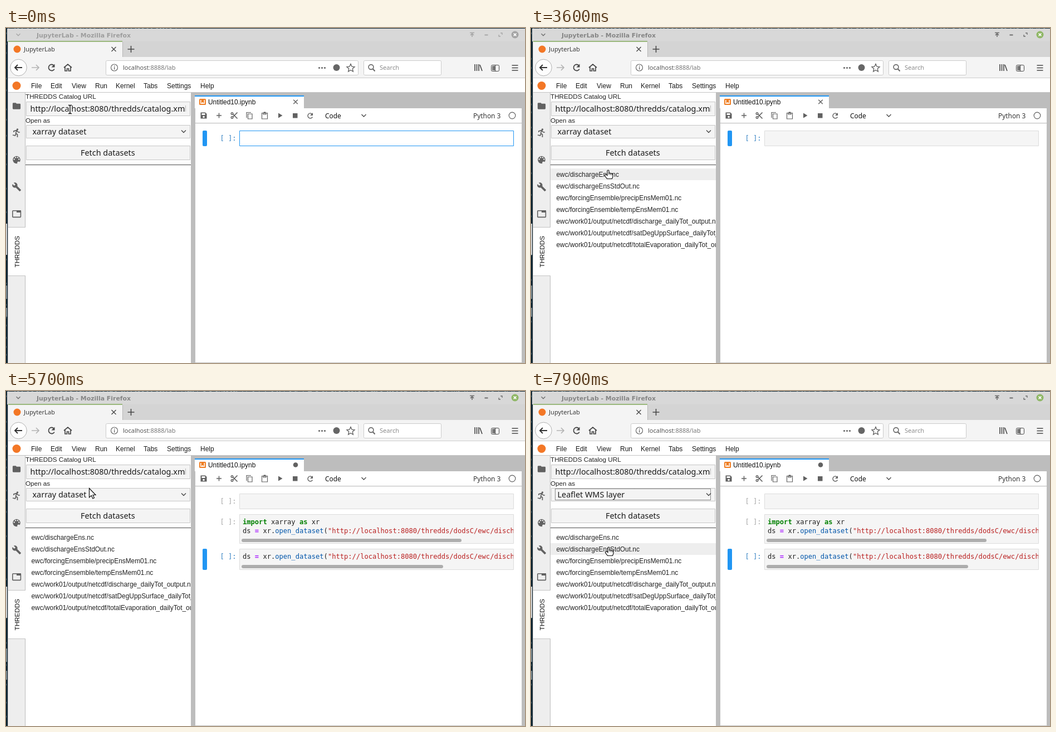
An HTML page with a canvas that plays this animation: 932 by 601 pixels, repeating every 8000 ms.

```html
<!DOCTYPE html>
<html lang="en">
<head>
<meta charset="utf-8">
<title>Dataset browser</title>
<style>
html, body { margin: 0; width: 100%; height: 100%; overflow: hidden; background: #bdbdbd; }
canvas { display: block; width: 932px; height: 601px; }
</style>
</head>
<body>
<canvas id="stage" width="932" height="601"></canvas>
<script>
const g = document.getElementById('stage').getContext('2d');
const LOOP = 8000;
const ARIAL = '"Liberation Sans", Arial, sans-serif';
const NOTO = '"Noto Sans", "Open Sans", sans-serif';
const MONO = '"DejaVu Sans Mono", monospace';
const ICON = '#616161', CHROME = '#474747', BLUE = '#2196f3', GREEN = '#9ab87c', ORANGE = '#f37726';

function rect(x, y, w, h, fill) {
  g.fillStyle = fill;
  g.fillRect(x, y, w, h);
}
function box(x, y, w, h, fill, border, r = 0) {
  g.beginPath();
  g.roundRect(x + .5, y + .5, w - 1, h - 1, r);
  g.fillStyle = fill;
  g.fill();
  g.strokeStyle = border;
  g.lineWidth = 1;
  g.stroke();
}
function pill(x, y, w, h, r, fill) {
  g.beginPath();
  g.roundRect(x, y, w, h, r);
  g.fillStyle = fill;
  g.fill();
}
function disc(x, y, r, fill) {
  g.beginPath();
  g.arc(x, y, r, 0, 7);
  g.fillStyle = fill;
  g.fill();
}
function ring(x, y, r, color, w = 1.2) {
  g.beginPath();
  g.arc(x, y, r, 0, 7);
  g.strokeStyle = color;
  g.lineWidth = w;
  g.stroke();
}
function text(s, x, y, size, font, color, weight = '') {
  g.font = `${weight} ${size}px ${font}`;
  g.fillStyle = color;
  g.fillText(s, x, y);
}
// Path data is relative to (x, y); a zero line width means filled.
function path(d, x, y, color, w = 0, scale = 1) {
  const p = new Path2D(d);
  g.save();
  g.translate(x, y);
  g.scale(scale, scale);
  if (w) {
    g.strokeStyle = color;
    g.lineWidth = w;
    g.stroke(p);
  } else {
    g.fillStyle = color;
    g.fill(p);
  }
  g.restore();
}
function clipped(x, y, w, h, draw) {
  g.save();
  g.beginPath();
  g.rect(x, y, w, h);
  g.clip();
  draw();
  g.restore();
}
const cross = (x, y, r, color, w) => path(`M${-r} ${-r}L${r} ${r}M${r} ${-r}L${-r} ${r}`, x, y, color, w);
const plus = (x, y, r, color, w) => path(`M${-r} 0H${r}M0 ${-r}V${r}`, x, y, color, w);
const chevron = (x, y, r, color, w = 1.4) => path(`M${-r} ${-r / 2}L0 ${r / 2}L${r} ${-r / 2}`, x, y, color, w);
function reload(x, y, r, color, w) {
  g.beginPath();
  g.arc(x, y, r, .5, 5.5);
  g.strokeStyle = color;
  g.lineWidth = w;
  g.stroke();
  path('M5 -6V-.5H-.5Z', x, y, color, 0, r / 5);
}

// Cursor keyframes: time, x, y, shape. Each pose holds until the next.
const poses = [[0, 115, 146, 'beam']];
function glide(start, steps, x0, y0, x1, y1, shape) {
  for (let i = 1; i <= steps; i++) {
    const k = i / steps, e = k * k * (3 - 2 * k), y = Math.round(y0 + (y1 - y0) * e);
    poses.push([start + (i - 1) * 100, Math.round(x0 + (x1 - x0) * e), y, shape(y)]);
  }
}
glide(200, 9, 115, 146, 133, 218, y => y < 157 ? 'beam' : 'arrow');
glide(2100, 4, 133, 218, 139, 255, y => y < 252 ? 'arrow' : 'hand');
poses.push(
  [3000, 138, 255, 'hand'], [4100, 136, 269, 'hand'], [4300, 136, 277, 'hand'],
  [4400, 136, 283, 'hand'], [5500, 143, 252, 'hand'], [5700, 149, 174, 'arrow'],
  [5900, 148, 176, 'arrow'], [6500, 148, 212, 'arrow'], [6600, 148, 226, 'arrow'],
  [6800, 140, 254, 'arrow'], [7000, 140, 264, 'arrow'], [7400, 140, 264, 'hand'],
  [7600, 141, 274, 'hand'], [7700, 142, 279, 'hand'], [7900, 139, 280, 'hand']);

const shapes = {
  arrow: 'M0 0V16.5L3.8 13L6.4 18.5L9 17.3L6.5 12H11.5Z',
  hand: 'M-1.5 9V1Q-1.5 -.5 0 -.5Q1.5 -.5 1.5 1V5Q3 4 4 5.5Q5.500 4.500 6.500 6Q8.500 5.500 8.500 8V11L7 15H-2L-6 9.500Q-6 7 -3.500 7.500Z'
};
function drawCursor([, x, y, shape]) {
  if (shape === 'beam') {
    path('M-3 -7.500H-1L0 -6.500L1 -7.500H3M0 -6.500V6.500M-3 7.500H-1L0 6.500L1 7.500H3', x, y, '#fff', 3);
    path('M-3 -7.500H-1L0 -6.500L1 -7.500H3M0 -6.500V6.500M-3 7.500H-1L0 6.500L1 7.500H3', x, y, '#111', 1.4);
    return;
  }
  path(shapes[shape], x + .5, y + .5, '#fff');
  path(shapes[shape], x + .5, y + .5, '#111', 1.2);
  if (shape === 'hand') path('M1.500 5V8M4 6V8.500M6.500 6.500V9', x + .5, y + .5, '#111', .8);
}

function drawDesktop(t) {
  rect(0, 0, 932, 601, '#0d2431');
  let seed = 7;
  const random = () => (seed = seed * 16807 % 2147483647) / 2147483647;
  const reach = t < 1500 ? 318 : 925;
  for (let x = 4; x < reach; x += 3 + random() * 9) rect(x, 0, 1 + random() * 3, 1, '#587078');
  for (let y = 8; y < 600; y += 14 + random() * 32) rect(0, y, 1, 3, '#48616b');
  rect(0, 351, 2, 56, '#d8dadb');
  rect(0, 462, 2, 24, '#7d8b91');
  rect(0, 502, 2, 16, '#7d8b91');
}

function drawBrowser(focused) {
  const title = focused ? '#858585' : '#9d9d9d', control = focused ? '#6c6c6c' : '#a6a6a6';
  rect(3, 1, 929, 600, '#bdbdbd');
  rect(2, 1, 930, 23, '#d8d8d8');
  rect(4, 24, 928, 28, '#d4d4d4');
  chevron(22, 12, 3.5, control, 1.3);
  text('JupyterLab - Mozilla Firefox', 55, 16.5, 10.9, '"DejaVu Sans", sans-serif', title, 'bold');
  path('M-4 -3.500H4M0 4V-1M-3 1L0 -2L3 1', 837, 12, control, 1.6);
  path('M-3 0H3', 862.5, 12.5, control, 2);
  path('M0 -3H3V0M0 3H-3V0', 888, 12, control, 1.3);
  disc(914, 12, 6.5, focused ? '#8fb766' : '#a4a4a4');
  cross(914, 12, 2.4, '#fff', 1.5);

  rect(4, 24, 205, 28, '#f4f4f4');
  rect(4, 23, 205, 2, GREEN);
  rect(209, 25, 1, 27, '#b8b8b8');
  disc(20, 38, 6.5, ORANGE);
  text('JupyterLab', 32, 42, 11.1, NOTO, '#3c3c3c');
  cross(193.5, 38, 4, CHROME, 1.4);
  plus(224.5, 38, 6, CHROME, 1.6);

  rect(4, 52, 928, 38, '#f4f4f4');
  rect(4, 89, 928, 1, '#cdcdcd');
  disc(22.5, 71, 15, '#fdfdfd');
  ring(22.5, 71, 14.8, '#b0b0b0', 1);
  path('M7 0H-6M-1 -5L-6 0L-1 5', 22, 71, '#303030', 1.9);
  path('M-7 0H6M1 -5L6 0L1 5', 53, 71, '#b4b4b4', 1.7);
  reload(82, 71, 5.5, CHROME, 1.8);
  path('M-7 0L0 -6L7 0M-5 -1V6H-1.500V2H1.500V6H5V-1', 111, 71, CHROME, 1.7);
  box(179, 58, 454, 27, '#fff', '#cbcbcb', 2);
  ring(194.5, 71, 6, '#686868');
  rect(194, 70, 1.3, 4.5, '#686868');
  rect(194, 67.5, 1.3, 1.5, '#686868');
  text('localhost', 210, 75, 11, NOTO, '#555');
  const hostWidth = g.measureText('localhost').width;
  text(':8888/lab', 210 + hostWidth, 75, 11, NOTO, '#777');
  for (const x of [562.5, 567.5, 572.5]) disc(x, 71.5, 1.6, '#666');
  disc(593.5, 71, 6, '#666');
  path('M0 -7L2.100 -2.300L7 -1.800L3.300 1.600L4.300 6.500L0 4L-4.300 6.500L-3.300 1.600L-7 -1.800L-2.100 -2.300Z', 619, 71.5, '#626262', 1.4);
  box(642, 58, 140, 27, '#fff', '#cbcbcb', 2);
  ring(655.5, 70, 4.4, '#666', 1.6);
  path('M3 3L7 7.500', 655.5, 70, '#666', 1.9);
  text('Search', 671, 75, 11.1, NOTO, '#8c8c8c');
  path('M-6 -6V6M-2.500 -6V6M1 -6V6M3 -5L7 6', 848, 71, CHROME, 1.6);
  box(871, 66, 15, 12, '#f4f4f4', CHROME, 2);
  rect(873, 68, 5, 8, '#777');
  rect(878, 66, 1, 12, CHROME);
  path('M-5.500 -4.500H5.500M0 0M-5.500 0H5.500M-5.500 4.500H5.500', 914, 71.5, CHROME, 1.7);
}

function drawSidebar() {
  rect(4, 90, 928, 26, '#fff');
  rect(4, 115, 928, 1, '#c4c4c4');
  disc(19, 103.5, 7.5, ORANGE);
  const menus = { File: 45, Edit: 80, View: 118, Run: 160, Kernel: 197, Tabs: 247, Settings: 289, Help: 349 };
  for (const name in menus) text(name, menus[name], 108, 12, ARIAL, '#1c1c1c');

  rect(4, 116, 31, 485, '#eee');
  rect(34, 116, 1, 485, '#bdbdbd');
  rect(4, 357, 31, 88, '#fff');
  rect(4, 357, 31, 1, '#c4c4c4');
  rect(4, 444, 31, 1, '#c4c4c4');
  path('M10 4H4c-1.100 0-2 .9-2 2v12c0 1.100.9 2 2 2h16c1.100 0 2-.9 2-2V8c0-1.100-.9-2-2-2h-8z', 10.5, 131.5, ICON, 0, .71);
  disc(20.5, 182, 1.7, ICON);
  path('M-5 -1V-3L0 -4.500L3 -1H6M0 -4L-1.500 1L1.500 3V8M-1 1L-2.500 5L-7 4', 19, 188, ICON, 1.7);
  disc(19, 236.5, 6.8, ICON);
  for (const [x, y] of [[14.8, 235.5], [17.2, 232.3], [21, 232.3], [23.3, 235.5]]) disc(x, y, 1.2, '#eee');
  disc(22.5, 242, 2.4, '#eee');
  path('M22.700 19l-9.100-9.100c.9-2.300.4-5-1.500-6.900-2-2-5-2.400-7.400-1.300L9 6 6 9 1.600 4.700C.4 7.100.9 10.100 2.900 12.100c1.900 1.900 4.600 2.400 6.900 1.500l9.100 9.100c.4.4 1 .4 1.400 0l2.300-2.300c.5-.4.5-1.100.1-1.400z', 10.5, 276.5, ICON, 0, .72);
  g.beginPath();
  g.roundRect(11.8, 327.8, 14.6, 11.6, 1);
  g.strokeStyle = ICON;
  g.lineWidth = 1.6;
  g.stroke();
  rect(19, 327, 8, 4, ICON);
  g.save();
  g.translate(24, 429.5);
  g.rotate(-Math.PI / 2);
  text('THREDDS', 0, 0, 11.7, ARIAL, '#111');
  g.restore();
}

const datasets = [
  'dischargeEns.nc', 'dischargeEnsStdOut.nc', 'forcingEnsemble/precipEnsMem01.nc',
  'forcingEnsemble/tempEnsMem01.nc', 'work01/output/netcdf/discharge_dailyTot_output.nc',
  'work01/output/netcdf/satDegUppSurface_dailyTot_output.nc',
  'work01/output/netcdf/totalEvaporation_dailyTot_output.nc'];
const choices = ['xarray dataset', 'Iris data cube', 'Leaflet WMS layer', 'Download'];

function drawPanel(t, [, , y, shape]) {
  rect(35, 116, 297, 485, '#fff');
  text('THREDDS Catalog URL', 35, 127, 11.7, ARIAL, '#222');
  box(36, 132, 295, 26, '#f4f4f4', '#c6c6c6');
  clipped(43, 133, 280, 24, () =>
    text('http://localhost:8080/thredds/catalog.xml', 43.5, 150, 14.4, NOTO, '#1a1a1a'));
  text('Open as', 35, 170, 11.7, ARIAL, '#222');
  box(36, 174, 295, 24, '#f4f4f4', '#c6c6c6');
  text(choices[t < 7400 ? 0 : 2], 47.5, 190.5, 14.4, NOTO, '#1a1a1a');
  chevron(319, 185.5, 4, '#444', 1.3);
  if (t >= 6200) {
    g.setLineDash([1, 1]);
    g.strokeStyle = '#222';
    g.lineWidth = 1;
    g.strokeRect(43.5, 175.5, 279, 20);
    g.setLineDash([]);
  }
  const pressed = t >= 1500 && t < 1600;
  box(36, 211, 295, 26, pressed ? '#e2e2e2' : '#f4f4f4', '#c6c6c6');
  text('Fetch datasets', 134, 229, 14.4, NOTO, '#1a1a1a');
  rect(35, 245, 297, 1, '#4a4a4a');

  if (t >= 1700) clipped(35, 246, 297, 200, () => {
    datasets.forEach((name, i) => {
      const top = 252 + i * 21;
      if (shape === 'hand' && y >= top && y < top + 21) rect(35, top, 297, 21, '#eee');
      text('ewc/' + name, 45.5, top + 15, 11.9, ARIAL, '#222');
    });
  });
  if (t >= 6200 && t < 7400) drawChoices(t < 6800 ? 0 : 2);
  if (t >= 3000 && t < 3600) {
    box(138, 278, 132, 33, '#fbeaa0', '#d3c37c', 2);
    text('ewc/dischargeEns.nc', 148, 298.5, 11.1, NOTO, '#222');
  }
}

function drawChoices(active) {
  box(36, 197, 294, 108, '#fff', '#cfcfcf');
  choices.forEach((name, i) => {
    const top = 198 + i * 26.5;
    if (i === active) rect(37, Math.round(top), 292, 27, GREEN);
    text(name, 45.5, top + 17.5, 11.1, NOTO, i === active ? '#fff' : '#4c4c4c');
  });
}

function drawToolbar(dirty) {
  rect(339, 121, 196, 23, '#fff');
  rect(339, 121, 196, 2, BLUE);
  pill(347, 127, 12, 11, 1.5, '#ef7d22');
  rect(349, 129, 8, 7, '#fff');
  path('M0 0H5V6L2.500 4L0 6Z', 350.5, 129, '#ef7d22');
  text('Untitled10.ipynb', 363, 137, 11.9, ARIAL, '#111');
  if (dirty) disc(520, 132.5, 4.3, ICON);
  else cross(520, 132.5, 3.8, ICON, 1.4);

  rect(340, 144, 586, 456, '#fff');
  rect(340, 170, 586, 1, '#c4c4c4');
  rect(340, 171, 586, 1, '#eee');
  path('M-5.500 -5.500H3L5.500 -3V5.500H-5.500Z', 355, 157, ICON);
  rect(351.5, 153, 6, 3, '#fff');
  disc(355, 159.5, 1.8, '#fff');
  plus(382.5, 157, 4.5, ICON, 1.5);
  ring(406, 153.5, 1.8, ICON, 1.4);
  ring(406, 160.5, 1.8, ICON, 1.4);
  path('M-2 -2.500L6 5.500M-2 2.500L6 -5.500', 409.5, 157, ICON, 1.7);
  path('M-5 4V-5.500H3M-2.500 -3H5V6H-2.500Z', 437, 157, ICON, 1.2);
  path('M-5 -4.500H5V6H-5ZM-2.500 -4.500V-2H2.500V-4.500', 464.5, 157, ICON, 1.2);
  rect(462.5, 150.5, 4, 3, ICON);
  path('M-3.500 -4.500L4 0L-3.500 4.500Z', 492.5, 157, ICON);
  rect(515, 153, 8.5, 8.5, ICON);
  reload(546.5, 157.5, 4.5, ICON, 1.4);
  text('Code', 573, 161.5, 11.9, NOTO, '#111');
  chevron(642.5, 157, 4, CHROME, 1.3);
  text('Python 3', 839, 161.5, 11.9, NOTO, '#333');
  ring(909, 157, 5.8, ICON, 1.2);
}

function drawCode(x, y, parts) {
  for (const [s, color, weight] of parts) {
    text(s, x, y, 12.1, MONO, color, weight);
    x += g.measureText(s).width;
  }
}
const importLine = [['import', '#008000', 'bold'], [' xarray ', '#212121'], ['as', '#008000', 'bold'], [' xr', '#212121']];
const openLine = [['ds ', '#212121'], ['=', '#aa22ff', 'bold'], [' xr.', '#212121'], ['open_dataset', '#0055aa'],
  ['(', '#212121'], ['"http://localhost:8080/thredds/dodsC/ewc/dischargeEns.nc")', '#ba2121']];

function drawCell(top, height, active, editing, lines = [], thumb = 0) {
  if (active) pill(353, top, 8, height, 2, BLUE);
  text('[ ]:', 384.5, top + 18, 12.1, MONO, active ? '#307fc1' : '#a5a5a5');
  box(419, top, 493, height, editing ? '#fff' : '#f5f5f5', editing ? BLUE : '#dcdcdc');
  clipped(420, top, 491, height, () =>
    lines.forEach((line, i) => drawCode(425, top + 18 + i * 16, line)));
  if (thumb) pill(423, top + height - 9, thumb, 6, 3, '#adadad');
}

function drawNotebook(t) {
  drawToolbar(t >= 3800);
  drawCell(184, 28, t < 3800, t < 1400);
  if (t >= 3800) drawCell(221, 53, t < 4900, false, [importLine, openLine], 395);
  if (t >= 4900) drawCell(283, 38, true, false, [openLine], 362);
}

function draw(t) {
  const cursor = poses.findLast(pose => pose[0] <= t);
  drawDesktop(t);
  drawBrowser(t >= 1400);
  drawSidebar();
  drawPanel(t, cursor);
  drawNotebook(t);
  drawCursor(cursor);
}
function frame() {
  draw(performance.now() % LOOP);
  requestAnimationFrame(frame);
}
frame();
</script>
</body>
</html>
```
